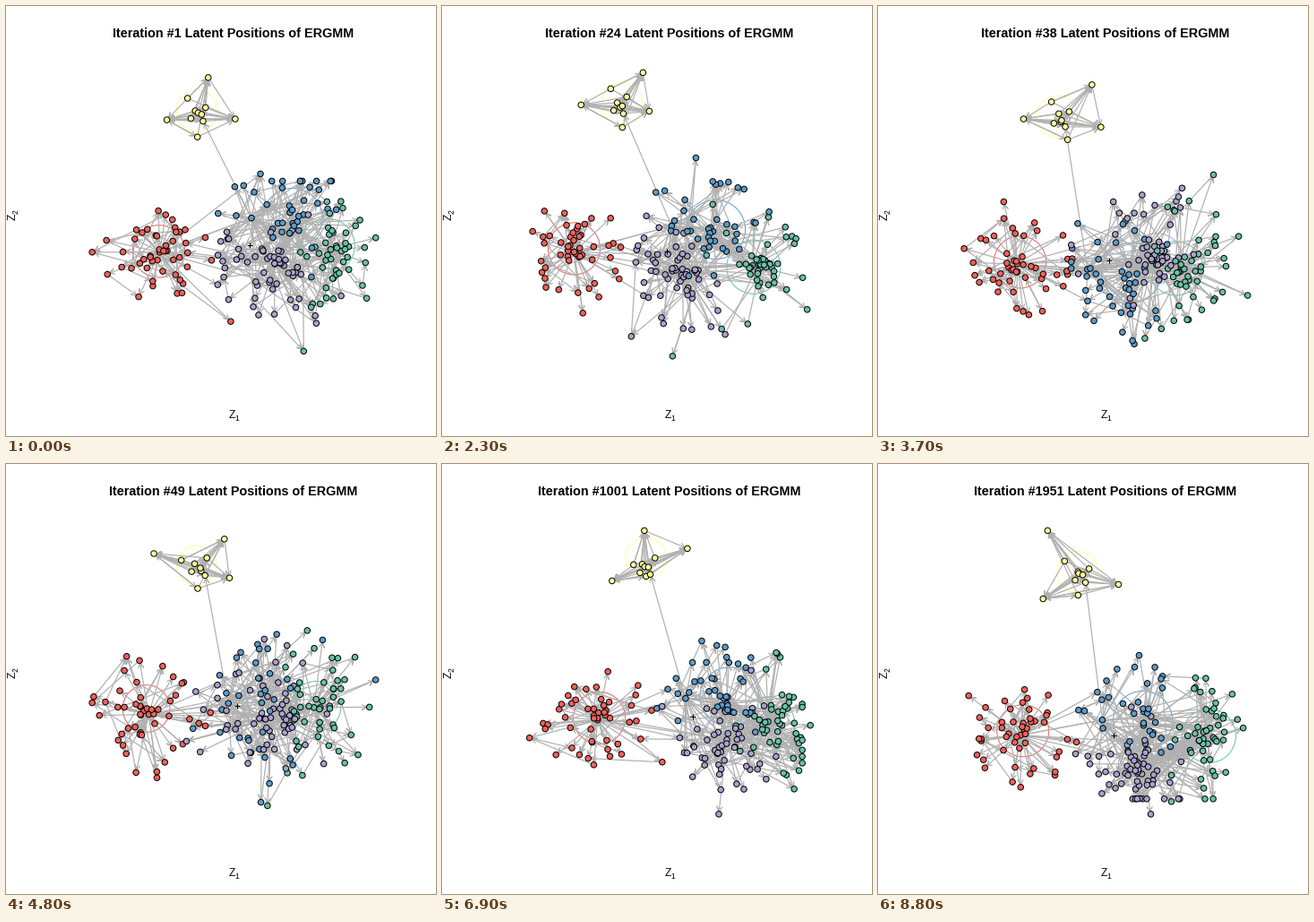
A matplotlib script that plays this animation: 480 px wide and 480 px high, repeating every 8.9 s.

```python
import numpy as np
import matplotlib.pyplot as plt
from matplotlib.animation import FuncAnimation
from matplotlib.collections import LineCollection
from matplotlib.colors import to_rgb
from matplotlib.patches import Circle

SIZE, DPI = 480, 80
PT = 72 / DPI                      # points per pixel
FRAMES, INTERVAL = 89, 100
N_YELLOW, N_RED, N_MAIN = 11, 50, 146
RED0, MAIN0 = N_YELLOW, N_YELLOW + N_RED
TOTAL = MAIN0 + N_MAIN
BRIDGE = MAIN0 + 3
YELLOW, RED, BLUE, PURPLE, GREEN = range(5)
PALETTE = np.array([to_rgb(c) for c in
                    ("#ffff99", "#f4605a", "#5b9ccb", "#a8a2ce", "#66c2a8")])
EDGE = "#b0b0b0"
GOLDEN = np.pi * (3 - np.sqrt(5))

rng = np.random.default_rng(11)
poses = []


def pts(flat):
    return np.array(flat, float).reshape(-1, 2)


def distances(a, b):
    return np.linalg.norm(a[:, None] - b[None], axis=2)


def nearest_order(prev, new):
    """Greedy pairing, so each node moves to a place near its last one."""
    gap = distances(prev, new)
    order = np.zeros(len(prev), int)
    for _ in order:
        i, j = np.unravel_index(gap.argmin(), gap.shape)
        order[i] = j
        gap[i, :] = gap[:, j] = np.inf
    return order


def halo(centre, n, inner, outer):
    angle = GOLDEN * np.arange(n) + rng.uniform(0, 6) + rng.normal(0, .2, n)
    r = rng.uniform(inner, outer, n)
    return centre + np.stack([r * np.cos(angle), .92 * r * np.sin(angle)], 1)


def yellow_nodes(flat):
    outer = pts(flat)
    core = pts([9, -8, 5, 9, -7, 6, -3, -3, 0, 1, 3, 1])
    return np.vstack([outer[:5], outer[5] + core + rng.normal(0, 1, core.shape)])


def red_nodes(flat):
    given = pts(flat)
    leaves = halo(given[0], 26, 30, 64)
    core = rng.normal(given[0], 14, (N_RED - 29, 2))
    left = given[1, 0] + 6
    leaves[:, 0] = np.maximum(leaves[:, 0], left + rng.uniform(0, 12, 26))
    return np.vstack([given, leaves, core])


def main_nodes(hubs, far):
    bridge = hubs[1] + (-46, -6)
    leaves = halo(hubs.mean(0) - (6, 0), 52, 55, 98)
    fill = N_MAIN - len(far) - 56
    pick = rng.choice(3, fill, p=(.42, .25, .33))
    cloud = hubs[pick] + rng.normal(size=(fill, 2)) * rng.uniform(8, 30, (fill, 1))
    rest = np.clip(np.vstack([leaves, cloud]), (216, 196), (402, 374))
    near = distances(leaves + rng.normal(0, 14, leaves.shape), hubs).argmin(1)
    kind = np.array([PURPLE, BLUE, GREEN])
    label = np.concatenate([kind, [BLUE], [BLUE, PURPLE, GREEN, GREEN],
                            kind[near], kind[pick]])
    return np.vstack([hubs, bridge, far, rest]), label


def pose(frame, yellow, red, hubs, far):
    """yellow: right, left, top, bottom, upper left, core; red: hub, two far;
    hubs: purple, blue, green; far: the most remote nodes of those groups."""
    yellow, red, hubs = yellow_nodes(yellow), red_nodes(red), pts(hubs)
    main, label = main_nodes(hubs, pts(far))
    if poses:
        last = poses[-1]["xy"]
        red[1:] = red[1:][nearest_order(last[RED0 + 1:MAIN0], red[1:])]
        o = 4 + nearest_order(last[MAIN0 + 4:], main[4:])
    else:
        o = 4 + rng.permutation(N_MAIN - 4)
    main[4:], label[4:] = main[o], label[o]

    rings = np.vstack([yellow[-2] + (1, -4), red[0] + (-1, -3),
                       hubs[1] + (2, -3), hubs[0], hubs[2]])
    rings += rng.normal(0, 3, rings.shape)
    poses.append(dict(frame=frame, xy=np.vstack([yellow, red, main]),
                      color=np.repeat([YELLOW, RED, 0], [N_YELLOW, N_RED, N_MAIN]),
                      rings=np.column_stack([rings, [23, 29, 33, 28, 30]])))
    poses[-1]["color"][MAIN0:] = label


pose(0, [256, 127, 180, 128, 226, 81, 214, 147, 203, 104, 214, 121],
     [172, 275, 97, 275, 251, 352], [300, 288, 320, 243, 362, 272],
     [284, 188, 346, 354, 412, 259, 332, 385])
pose(9, [254, 134, 161, 128, 239, 90, 215, 150, 206, 106, 214, 124],
     [166, 276, 96, 274, 125, 321], [284, 302, 312, 260, 368, 285],
     [340, 191, 240, 376, 413, 302, 355, 348])
pose(23, [231, 118, 155, 111, 224, 75, 201, 136, 188, 93, 198, 111],
     [147, 275, 101, 252, 157, 343], [268, 294, 302, 252, 346, 290],
     [283, 170, 211, 369, 407, 339, 257, 391])
pose(37, [249, 136, 163, 127, 239, 89, 212, 150, 194, 108, 204, 126],
     [156, 288, 97, 271, 141, 219], [308, 282, 280, 300, 338, 292],
     [286, 377, 216, 267, 412, 323, 374, 189])
pose(59, [241, 137, 179, 98, 246, 90, 211, 158, 209, 125, 227, 123],
     [160, 285, 96, 248, 138, 343], [288, 300, 300, 253, 352, 270],
     [412, 256, 250, 376, 326, 184, 325, 369])
pose(69, [274, 95, 190, 131, 226, 75, 228, 126, 214, 113, 228, 115],
     [174, 286, 98, 306, 246, 333], [318, 308, 318, 268, 364, 288],
     [290, 198, 309, 391, 411, 292, 393, 363])
pose(88, [269, 135, 185, 151, 190, 75, 224, 147, 209, 109, 226, 124],
     [160, 303, 102, 259, 160, 361], [297, 335, 297, 292, 367, 298],
     [292, 214, 305, 391, 408, 295, 328, 377])


def make_edges():
    mean = np.mean([p["xy"] for p in poses], axis=0)

    def near(j, start, stop, fall):
        p = np.exp(-np.linalg.norm(mean[start:stop] - mean[j], axis=1) / fall)
        return start + rng.choice(stop - start, p=p / p.sum())

    out = [(c, o) for o in range(3) for c in range(3, N_YELLOW)]
    out += [(a, b) for a in range(5, N_YELLOW) for b in range(5, a)]
    out += [(1, 0), (0, 1), (2, 0), (4, 2), (1, 3), (BRIDGE, 6)]
    out += [(RED0, j) for j in range(RED0 + 1, MAIN0)]
    out += [tuple(rng.integers(RED0 + 1, MAIN0, 2)) for _ in range(20)]
    for j in range(MAIN0 + 4, TOTAL):
        out.append((near(j, MAIN0, MAIN0 + 4, 22), j))
        if rng.random() < .75:
            out.append((j, near(j, MAIN0, TOTAL, 30)))
    out += [(RED0, MAIN0 + j) for j in np.argsort(mean[MAIN0:, 0])[:4]]
    out += [(MAIN0, RED0 + j) for j in np.argsort(-mean[RED0:MAIN0, 0])[:2]]
    out += [(BRIDGE, RED0), (MAIN0, RED0), (MAIN0, BRIDGE), (BRIDGE, MAIN0 + 1)]
    return np.array([e for e in out if e[0] != e[1]])


edges = make_edges()
times = [p["frame"] for p in poses]
switch = rng.uniform(.05, .95, (len(poses), TOTAL))
smooth = np.zeros(TOTAL, bool)
smooth[:RED0 + 1] = smooth[MAIN0:MAIN0 + 4] = True

# Sampler jitter: most nodes hold early on, all move once thinned
reach = np.full(TOTAL, 10.)
reach[smooth] = 3
reach[:5] = 6
reach[5:N_YELLOW] = 2
jitter = np.zeros((FRAMES, TOTAL, 2))
held = rng.normal(size=(TOTAL, 2))
for n in range(FRAMES):
    redo = rng.random(TOTAL) < (.4 if n < 50 else 1)
    held = np.where(redo[:, None], rng.normal(size=(TOTAL, 2)), held)
    jitter[n] = held * reach[:, None]
ring_jitter = rng.normal(0, 2, (FRAMES, 5, 3))


def layout(n):
    k = min(np.searchsorted(times, n, "right") - 1, len(poses) - 2)
    a, b = poses[k], poses[k + 1]
    u = (n - times[k]) / (times[k + 1] - times[k])
    late = switch[k] < u
    w = np.where(smooth, u, late)[:, None]
    loose = np.sqrt(4 * u * (1 - u))
    xy = a["xy"] + (b["xy"] - a["xy"]) * w + jitter[n] * loose
    rings = a["rings"] + (b["rings"] - a["rings"]) * u + ring_jitter[n] * loose
    color = np.where(late, b["color"], a["color"])

    # the view always fits the whole cloud
    lo, hi = xy.min(0), xy.max(0)
    scale = 316.5 / (hi - lo).max()
    mid, home = (lo + hi) / 2, np.array([254.4, 232.6])
    xy = (xy - mid) * scale + home
    rings[:, :2] = (rings[:, :2] - mid) * scale + home
    rings[:, 2] *= scale
    return xy, color, rings


def arrows(xy):
    tail, tip = xy[edges[:, 0]], xy[edges[:, 1]]
    d = tip - tail
    length = np.maximum(np.hypot(*d.T), 1e-6)[:, None]
    d = d / length
    tip = tip - d * np.minimum(3, length / 2)
    side = np.stack([-d[:, 1], d[:, 0]], axis=1) * 3
    back = tip - d * 5.4
    return np.stack([tail, tip, back + side, tip, back - side], axis=1)


fig = plt.figure(figsize=(SIZE / DPI, SIZE / DPI), dpi=DPI, facecolor="white")
ax = fig.add_axes([0, 0, 1, 1])
ax.set(xlim=(0, SIZE), ylim=(SIZE, 0))
ax.axis("off")


def text(x, y, s, px, **kw):
    return ax.text(x, y, s, fontsize=px * PT, family="Liberation Sans",
                   va="baseline", rotation_mode="anchor", **kw)


title = text(254, 35, "", 14.4, weight="bold", ha="center")
text(248.3, 460, "Z", 12)
text(255.8, 463, "1", 8.6)
text(11, 239, "Z", 12, rotation=90)
text(13.5, 231.5, "2", 8.6, rotation=90)

circles = [ax.add_patch(Circle((0, 0), 1, fill=False, ec=c, lw=PT, zorder=1))
           for c in PALETTE]
lines = ax.add_collection(LineCollection([], colors=EDGE, linewidths=1.2 * PT,
                                         joinstyle="round", zorder=2))
nodes = ax.scatter(np.zeros(TOTAL), np.zeros(TOTAL), s=(6.5 * PT) ** 2,
                   edgecolors="black", linewidths=PT, zorder=3)
cross, = ax.plot([], [], "+", color="black", ms=6 * PT, mew=PT, zorder=4)


def draw(n):
    xy, color, rings = layout(n)
    step = n + 1 if n < 50 else 51 + 50 * (n - 50)
    title.set_text(f"Iteration #{step} Latent Positions of ERGMM")
    lines.set_segments(arrows(xy))
    nodes.set_offsets(xy)
    nodes.set_facecolors(PALETTE[color])
    for c, (x, y, r) in zip(circles, rings):
        c.center, c.radius = (x, y), r
    mx, my = xy.mean(0)
    cross.set_data([mx - 9], [my + 3])
    return [title, lines, nodes, cross, *circles]


anim = FuncAnimation(fig, draw, frames=FRAMES, interval=INTERVAL, repeat=True)
plt.show()
```
